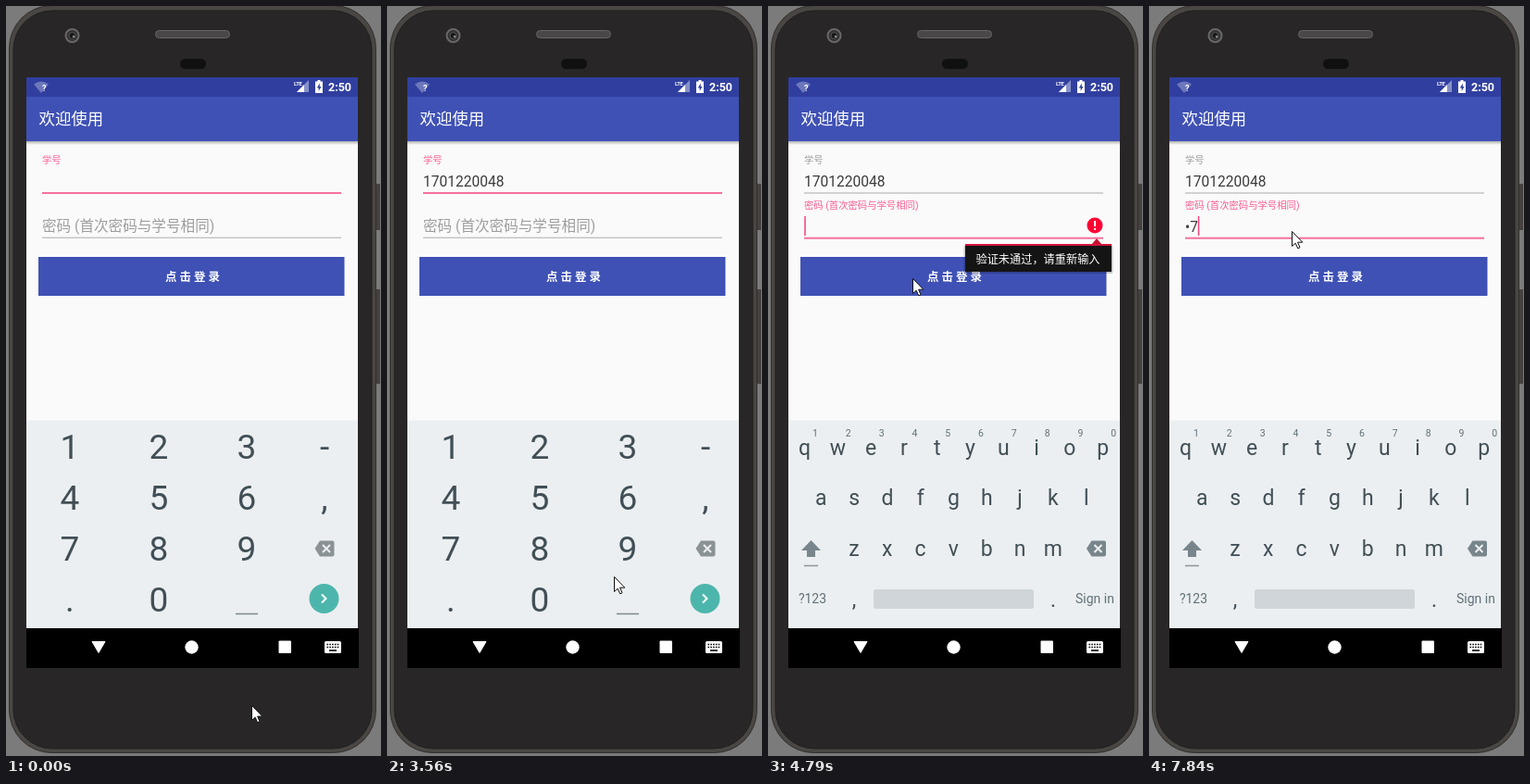
An HTML page that plays this animation: 405x810 px, repeating every 8000 ms.

```html
<!DOCTYPE html>
<html lang="zh-CN">
<head>
<meta charset="utf-8">
<title>Login screen</title>
<style>
  html, body { margin: 0; width: 100%; height: 100%; overflow: hidden; background: #7b7b7b; }
  svg { display: block; width: 405px; height: 810px; }
  text { font-family: Roboto, "Noto Sans CJK SC", "Noto Sans CJK", sans-serif; white-space: pre; }
  .mid { text-anchor: middle; }
  .key { fill: #414f56; text-anchor: middle; }
  .soft { fill: #607078; text-anchor: middle; }
</style>
</head>
<body>
<svg viewBox="0 0 405 810">
  <defs>
    <linearGradient id="shade" x2="0" y2="1">
      <stop stop-color="#000" stop-opacity=".3"/>
      <stop offset="1" stop-color="#000" stop-opacity="0"/>
    </linearGradient>
    <g id="erase">
      <path d="M-10.5 0L-5-8.5H8.5Q10.5-8.5 10.5-6.5V6.5Q10.5 8.5 8.5 8.5H-5Z"/>
      <path d="M-2-4L6 4M6-4L-2 4" stroke="#eceff1" stroke-width="2"/>
    </g>
  </defs>

  <!-- phone body -->
  <path d="M399 192h5v50h-5zM399 306h5v102h-5z" fill="#45413f"/>
  <rect x="3.5" y="-.5" width="396" height="807" rx="46" fill="#4a4643" stroke="#322f2d"/>
  <rect x="8" y="5" width="387" height="797" rx="42" fill="#292627" stroke="#211e1f"/>
  <circle cx="71.5" cy="32" r="7" fill="#343132" stroke="#6a6768" stroke-width="2"/>
  <circle cx="71.5" cy="32" r="3.5" fill="#171717" stroke="#555"/>
  <circle cx="73" cy="33" r="1.3" fill="#888"/>
  <rect x="161.5" y="26.5" width="80" height="8" rx="4" fill="#4a4748" stroke="#686566"/>
  <rect x="188" y="57" width="28" height="11" rx="5.5" fill="#111011"/>

  <!-- screen -->
  <rect x="22" y="77" width="358" height="638" fill="#fafafa"/>
  <rect x="22" y="77" width="358" height="21" fill="#303f9f"/>
  <rect x="22" y="98" width="358" height="48" fill="#3f51b5"/>
  <rect x="22" y="146" width="358" height="4" fill="url(#shade)"/>
  <rect x="22" y="672" width="359" height="43"/>

  <!-- status bar -->
  <path d="M30 84.5Q38 78.500 46 84.500L38 94Z" fill="#6d78bb"/>
  <text x="39" y="92" font-size="9" font-weight="700" fill="#fff">?</text>
  <text x="311" y="86" font-size="6" font-weight="700" fill="#fff" letter-spacing="-.4">LTE</text>
  <path d="M327 80V93H314Z" fill="#8791c9"/>
  <path d="M322 85V93H314Z" fill="#fff"/>
  <path d="M334 81.500h2.500V80h3v1.500H342V94H334Z" fill="#fff"/>
  <path d="M338.800 83.500L335.800 88.500H337.700V92L340.500 87H338.800Z" fill="#303f9f"/>
  <text x="348" y="92" font-size="12.5" font-weight="700" fill="#fff">2:50</text>
  <text x="35.500" y="128" font-size="17.400" font-weight="500" fill="#fff">欢迎使用</text>

  <!-- form -->
  <text id="idLabel" x="39" y="169.500" font-size="10.3">学号</text>
  <text id="idText" x="39" y="195" font-size="15.6" fill="#3c3c3c"></text>
  <rect id="idLine" x="39" width="323"/>
  <text id="hint" x="39">密码 (首次密码与学号相同)</text>
  <text id="passText" x="39" y="243.5" font-size="15.6" fill="#3c3c3c"></text>
  <rect id="passLine" x="39" width="323"/>
  <rect id="caret" width="1.600" fill="#f04c85"/>
  <rect x="35" y="271" width="330.500" height="42" fill="#3f51b5"/>
  <text x="201.500" y="297" class="mid" font-size="12.400" font-weight="700" fill="#fff">点 击 登 录</text>
  <g id="alert">
    <circle cx="353" cy="237" r="8.500" fill="#ff0033"/>
    <path d="M353 232V238M353 240V242" stroke="#fff" stroke-width="2"/>
  </g>
  <g id="popup">
    <rect x="211.500" y="258" width="161" height="31" rx="2" fill="#000" opacity=".2"/>
    <path d="M349.500 257.500L355 251L360.500 257.500Z" fill="#c8102e"/>
    <rect x="213" y="257" width="158" height="30" fill="#141414"/>
    <rect x="213" y="257" width="158" height="2" fill="#d0143c"/>
    <text x="224.500" y="278" font-size="12.200" fill="#fff">验证未通过，请重新输入</text>
  </g>

  <!-- keyboards -->
  <rect x="22" y="447.500" width="358" height="224.500" fill="#eceff1"/>
  <g id="digits">
    <path d="M248 656.500H272" stroke="#7c888e" stroke-width="1.500"/>
    <use href="#erase" x="344" y="586" fill="#8b9296"/>
    <circle cx="343.500" cy="640" r="16" fill="#4db6ac"/>
    <path d="M341 635.500L345.500 640L341 644.500" fill="none" stroke="#fff" stroke-width="2"/>
  </g>
  <g id="letters">
    <path d="M46.500 577L57 588H51V595H42V588H36Z" fill="#78868c"/>
    <path d="M39 604.500H54" stroke="#8a959a" stroke-width="1.500"/>
    <use href="#erase" x="354.500" y="586" fill="#78868c"/>
    <rect x="114" y="630" width="173" height="21" rx="2.500" fill="#cfd5d8"/>
    <text x="48" y="645" class="soft" font-size="14">?123</text>
    <text x="353" y="645" class="soft" font-size="14">Sign in</text>
  </g>

  <!-- navigation bar -->
  <g fill="#fff">
    <path d="M93 686.500H107L100 698.500Z" stroke="#fff" stroke-linejoin="round"/>
    <circle cx="200.500" cy="692.500" r="7.200"/>
    <rect x="294.500" y="685.500" width="13.500" height="13.500" rx="1"/>
    <rect x="344" y="686" width="18" height="13" rx="1.500"/>
  </g>
  <path d="M346.500 689.500H360M346.500 692.500H360" stroke="#000" stroke-width="1.600" stroke-dasharray="1.600 1.200"/>
  <path d="M349 696H357" stroke="#000" stroke-width="1.600"/>

  <path id="mouse" d="M.5.500V16.500L4.200 13.200L6.700 18.800L9 17.800L6.600 12.200H11.800Z" fill="#fff" stroke="#111"/>
</svg>
<script>
const $ = id => document.getElementById(id);
const set = (id, attrs) => { for (const k in attrs) $(id).setAttribute(k, attrs[k]); };
const clamp = x => Math.max(0, Math.min(1, x));
const mix = (a, b, p) => a + (b - a) * p;

const LOOP = 8000, FOCUS = 4490, SWAP = 4710, PASS = 7520;
const ID = '1701220048';
const ID_TIMES = [380, 610, 780, 1170, 1400, 1630, 2260, 2490, 2640, 2950];
const BLINKS = [150, 2100, 2260, 3420, 3950, 4960, 5460, 5960, 6440, 6970, PASS];
// time, x, y of the pointer tip
const PATH = [
  [3185, 265, 755], [3410, 275, 705], [3560, 245, 616], [3785, 205, 470],
  [4010, 158, 316], [4160, 156, 294], [4885, 156, 294], [5185, 158, 268], [5485, 154, 243]
];

function addKey(board, label, x, y, size, cls = 'key') {
  const el = document.createElementNS('http://www.w3.org/2000/svg', 'text');
  el.textContent = label;
  el.setAttribute('class', cls);
  el.setAttribute('x', x);
  el.setAttribute('y', y);
  el.setAttribute('font-size', size);
  $(board).append(el);
}

['123-', '456,', '789', '.0'].forEach((row, r) =>
  [...row].forEach((c, i) => addKey('digits', c, [69, 165, 260, 344][i], 489.3 + r * 54.8, 37)));
[['qwertyuiop', 39.5], ['asdfghjkl', 57.3], ['zxcvbnm', 93]].forEach(([row, x], r) =>
  [...row].forEach((c, i) => addKey('letters', c, x + i * 35.8, 484.5 + r * 54.8, 23)));
[...'1234567890'].forEach((c, i) => addKey('letters', c, 51 + i * 35.8, 465, 10.5, 'soft'));
addKey('letters', ',', 93, 649, 23);
addKey('letters', '.', 308, 649, 23);

const passed = (times, t) => times.filter(v => v <= t).length;

function pointer(t) {
  const s = t < 3260 ? 0 : 3260 + Math.floor((t - 3260) / 75) * 75;
  const i = PATH.findIndex(p => p[0] > s);
  if (i < 0) return PATH[PATH.length - 1].slice(1);
  if (!i) return PATH[0].slice(1);
  const a = PATH[i - 1], b = PATH[i], p = (s - a[0]) / (b[0] - a[0]);
  return [1, 2].map(k => Math.round(mix(a[k], b[k], p)));
}

function underline(id, y, focused) {
  set(id, focused ? { y: y - 1, height: 2, fill: '#f6709e' } : { y: y - .7, height: 1.4, fill: '#c2c2c2' });
}

function draw(t) {
  const inPass = t >= FOCUS;
  const count = passed(ID_TIMES, t);
  $('idText').textContent = ID.slice(0, count);
  set('idLabel', { fill: inPass ? '#9c9c9c' : '#fa5c93' });
  underline('idLine', 202, !inPass);
  underline('passLine', inPass ? 250.7 : 250.3, inPass);

  const q = clamp((t - 4525) / 190), p = q * q * (3 - 2 * q);
  const rgb = [[158, 250], [158, 92], [158, 147]].map(([a, b]) => Math.round(mix(a, b, p)));
  set('hint', { y: mix(243, 218.5, p * p), 'font-size': mix(15.6, 10.35, p), fill: `rgb(${rgb})` });

  const pass = t < PASS ? '' : t < 7840 ? '1' : '•7';
  $('passText').textContent = pass;

  const advance = inPass ? [0, 8.7, 13.6][pass.length] : count * 8.7;
  set('caret', {
    x: 39.2 + advance, y: inPass ? 227 : 178.5, height: inPass ? 21 : 20.5,
    opacity: passed(BLINKS, t) % 2
  });

  set('alert', { opacity: +(inPass && t < PASS) });
  set('popup', { opacity: Math.min(clamp((t - 4640) / 150), clamp((7690 - t) / 170)) });
  set('digits', { opacity: +(t < SWAP) });
  set('letters', { opacity: +(t >= SWAP) });
  set('mouse', { transform: `translate(${pointer(t)})` });
}

function tick() {
  draw(performance.now() % LOOP);
  requestAnimationFrame(tick);
}
tick();
</script>
</body>
</html>
```
